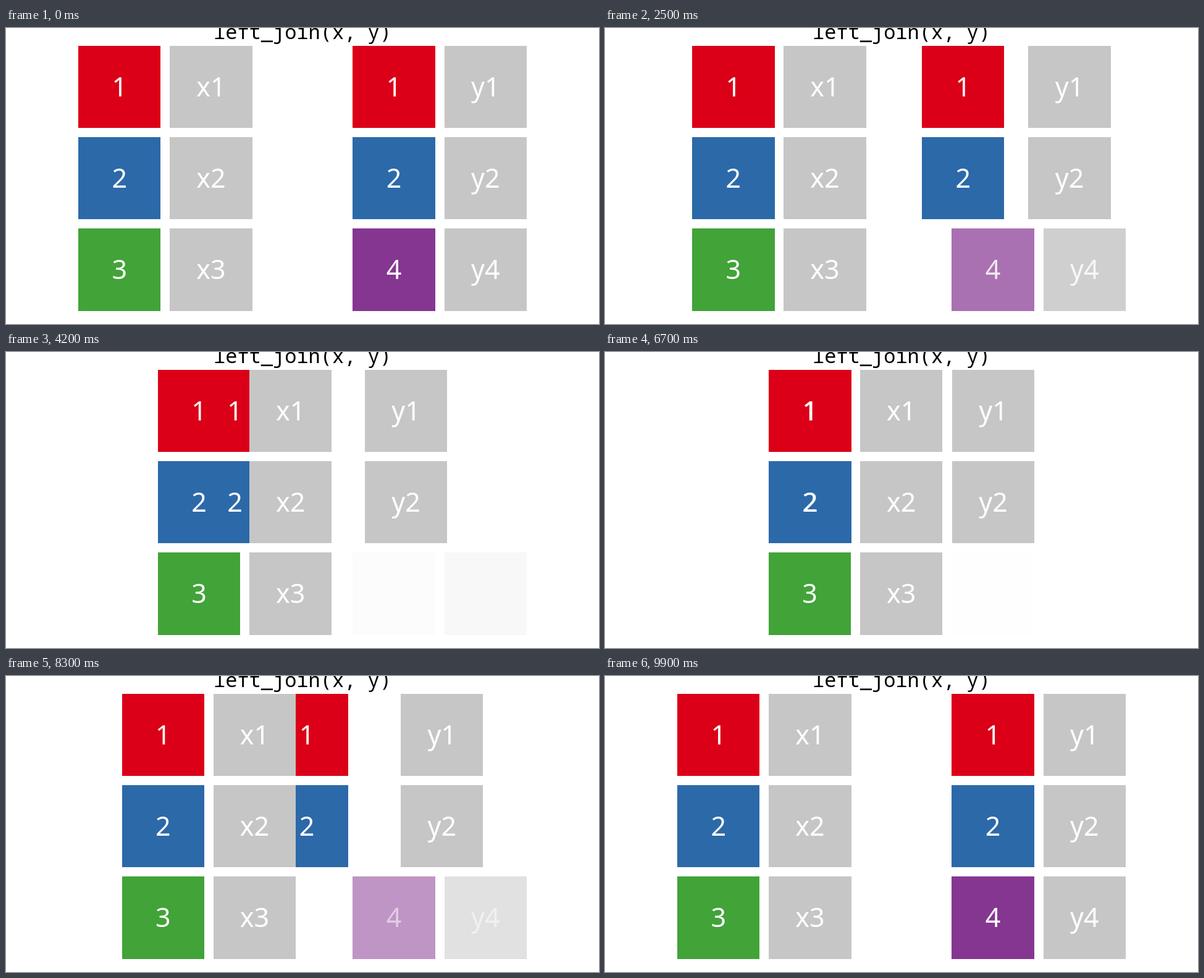
An HTML page that plays this animation: 960 px wide and 480 px high, repeating every 10 s.

```html
<!DOCTYPE html>
<html lang="en">
<head>
<meta charset="utf-8">
<title>left_join(x, y)</title>
<style>
  html, body { margin: 0; width: 100%; height: 100%; overflow: hidden; background: #fff; }
  svg { display: block; width: 960px; height: 480px; }
  text { text-anchor: middle; }
  .label { font: 43px "Noto Sans", "Open Sans", sans-serif; fill: #fff; }
  .title { font: 32px "Noto Sans Mono", "DejaVu Sans Mono", monospace; fill: #000; }
</style>
</head>
<body>
<svg viewBox="0 0 960 480">
  <text class="title" x="480" y="18" xml:space="preserve">left_join(x, y)</text>
  <g id="tiles"></g>
  <g id="labels"></g>
</svg>
<script>
const LOOP = 10000, STEP = 100;
const UNIT = 4000 / 27;          // grid pitch
const SIZE = UNIT * 0.9;
const TOP = 28.95;
const RED = '#db0017', BLUE = '#2c69a9', GREEN = '#41a338', PURPLE = '#853691', GREY = '#c6c6c6';

// label, colour, row, start column and shift (in grid units from the centre), fade power
const cells = [
  ['1', RED, 0, 1, -2], ['2', BLUE, 1, 1, -2], ['4', PURPLE, 2, 1, 0, 2],
  ['1', RED, 0, -2, 1], ['2', BLUE, 1, -2, 1], ['3', GREEN, 2, -2, 1],
  ['x1', GREY, 0, -1, 1], ['x2', GREY, 1, -1, 1], ['x3', GREY, 2, -1, 1],
  ['y1', GREY, 0, 2, -1], ['y2', GREY, 1, 2, -1], ['y4', GREY, 2, 2, 0, 1]
].map(([label, fill, row, col, shift, fade]) => {
  const y = TOP + row * UNIT, y0 = Math.round(y);
  const rect = add('tiles', 'rect', { fill, y: y0, height: Math.round(y + SIZE) - y0 });
  const text = add('labels', 'text', { class: 'label', y: y + SIZE / 2 + 15.4 });
  text.textContent = label;
  return { rect, text, col, shift, fade };
});

function add(parent, tag, attrs) {
  const el = document.createElementNS('http://www.w3.org/2000/svg', tag);
  set(el, attrs);
  return document.getElementById(parent).appendChild(el);
}

function set(el, attrs) {
  for (const name in attrs) el.setAttribute(name, attrs[name]);
}

function ease(t, from, to) {
  const k = Math.min(1, Math.max(0, (t - from) / (to - from)));
  return (1 - Math.cos(Math.PI * k)) / 2;
}

function draw(now) {
  const t = Math.floor(now / STEP) * STEP % LOOP;
  const leaving = t < 6600;
  const p = leaving ? ease(t, 1600, 5000) : 1 - ease(t, 6600, 9900);
  for (const { rect, text, col, shift, fade } of cells) {
    const cx = 480 + (col + shift * p) * UNIT;
    const x0 = Math.round(cx - SIZE / 2);
    set(rect, { x: x0, width: Math.round(cx + SIZE / 2) - x0 });
    set(text, { x: cx });
    if (fade) {
      set(rect, { opacity: (1 - p) ** (leaving ? fade : 1) });
      set(text, { opacity: 1 - p });
    }
  }
}

function tick() {
  draw(performance.now());
  requestAnimationFrame(tick);
}
tick();
</script>
</body>
</html>
```
